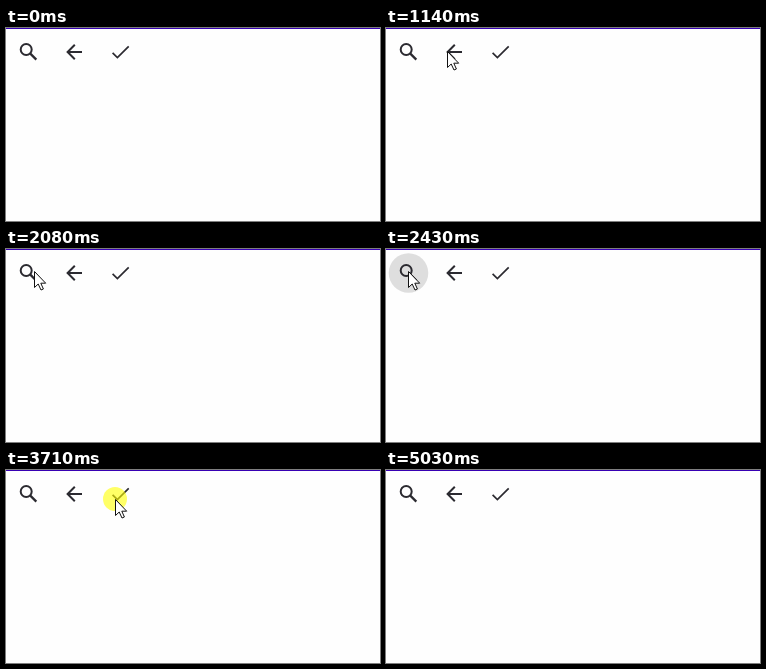
Recreate the animation shown at these times as an HTML page. Size 374 by 193 pixels, loop 5.32 s.

```html
<!DOCTYPE html>
<html lang="en">
<head>
<meta charset="utf-8">
<title>Icon buttons</title>
<style>
html, body { margin: 0; width: 100%; height: 100%; overflow: hidden; background: #fefefe; }
svg { display: block; }
</style>
</head>
<body>
<svg width="374" height="193" viewBox="0 0 374 193">
  <rect width="374" height="1" fill="#3700b3"/>
  <g id="ripples"></g>
  <g fill="none" stroke="#2b2a30" stroke-width="2">
    <g transform="translate(22.500 24)">
      <circle cx="-2.300" cy="-2.500" r="5.500"/>
      <path d="M1.800 1.600 7.800 7.600" stroke-width="2.300"/>
    </g>
    <path transform="translate(68.500 24)" d="M7.500 0H-6.500M.3-7.200-6.900 0 .3 7.200"/>
    <path transform="translate(114.500 24)" d="M-7.900.8-3.100 5.600 8.200-5.700" stroke-width="1.700"/>
  </g>
  <circle id="press" r="12" fill="#ff0" fill-opacity=".6"/>
  <path id="cursor" d="M.5.5V16.500L4.200 13 7 19 9.400 18 6.800 12.200H11.700Z" fill="#fff" stroke="#111" stroke-linejoin="round"/>
</svg>
<script>
const LOOP = 5320;
const byId = id => document.getElementById(id);
const clamp = v => Math.max(0, Math.min(1, v));
const easeOut = v => 1 - (1 - clamp(v)) ** 3;
const smooth = v => v * v * (3 - 2 * v);
const bezier = (a, b, c, k) => a * (1 - k) ** 2 + 2 * b * k * (1 - k) + c * k * k;

// Cursor moves; "press" is when the button under its end point is clicked
const moves = [
  { start: 0, end: 510, to: [98, 73] },
  { start: 620, end: 1140, to: [61, 23], press: 1562 },
  { start: 1740, end: 2200, to: [22, 22], press: 2310 },
  { start: 2860, end: 3250, to: [109, 40], via: [22, 54] },
  { start: 3420, end: 3600, to: [109, 29], press: 3680 },
  { start: 4320, end: 4830, to: [306, 200] }
];

const ripples = moves.flatMap((m, i) => {
  if (!m.press) return [];
  const el = document.createElementNS("http://www.w3.org/2000/svg", "circle");
  const column = Math.round((m.to[0] - 22) / 46);
  el.setAttribute("cx", 22.5 + 46 * column);
  el.setAttribute("cy", 24);
  byId("ripples").append(el);
  return { el, down: m.press, up: (moves[i + 1]).start };
});

function tip(t) {
  let from = [276, 203];
  for (const { start, end, to, via } of moves) {
    if (t < start) break;
    const k = smooth(clamp((t - start) / (end - start)));
    from = from.map((a, i) => bezier(a, via ? via[i] : (a + to[i]) / 2, to[i], k));
  }
  return from.map(Math.round);
}

function draw(now) {
  const t = now % LOOP;
  const place = `translate(${tip(t)})`;
  byId("cursor").setAttribute("transform", place);
  byId("press").setAttribute("transform", place);
  const pressed = ripples.some(r => t >= r.down && t < r.down + 80);
  byId("press").style.display = pressed ? "" : "none";

  for (const { el, down, up } of ripples) {
    const grow = easeOut((t - down - 30) / 180);
    const leave = easeOut((t - up) / 420);
    el.setAttribute("r", 22.5 * grow * (1 - .7 * leave));
    el.setAttribute("fill-opacity", .125 * (1 - leave));
  }
  requestAnimationFrame(draw);
}
requestAnimationFrame(draw);
</script>
</body>
</html>
```
